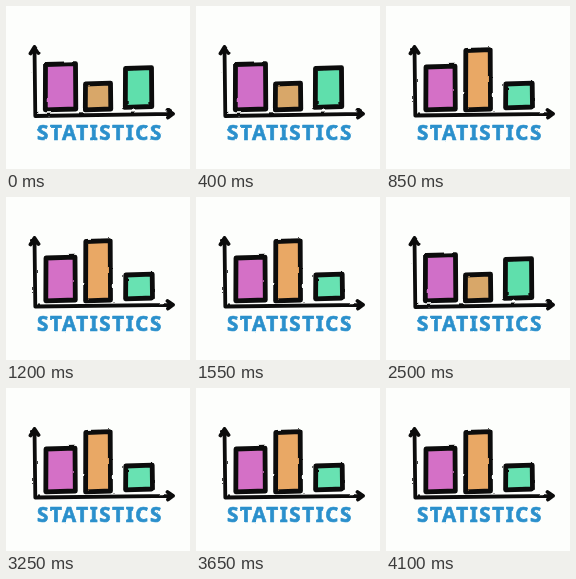
Recreate the animation shown at these times as an HTML page. Size 184 by 163 pixels, loop 4200 ms.

```html
<!DOCTYPE html>
<html lang="en">
<head>
<meta charset="utf-8">
<title>Statistics</title>
<style>
  html, body { margin: 0; width: 100%; height: 100%; overflow: hidden; background: #fdfefc; }
  svg { display: block; width: 100%; height: 100%; }
  path { stroke: #0c0c0c; stroke-linecap: round; stroke-linejoin: round; }
  .axis { fill: none; stroke-width: 3.8; }
  .bar { stroke-width: 4.8; }
  text {
    font: 600 20.5px "Noto Sans", "Open Sans", sans-serif;
    letter-spacing: 1.6px;
    fill: #2b90cc;
    stroke: #2b90cc;
    stroke-width: .7;
    stroke-linejoin: round;
  }
</style>
</head>
<body>
<svg viewBox="0 0 184 163">
  <filter id="rough" x="-5%" y="-5%" width="110%" height="110%" color-interpolation-filters="sRGB">
    <feTurbulence id="grain" type="fractalNoise" baseFrequency=".1" numOctaves="2"/>
    <feDisplacementMap in="SourceGraphic" scale="2" xChannelSelector="R" yChannelSelector="G"/>
    <feGaussianBlur stdDeviation=".55"/>
  </filter>
  <g filter="url(#rough)">
    <path class="axis" id="axes"/>
    <path class="bar"/>
    <path class="bar"/>
    <path class="bar"/>
    <text id="label" x="31" y="134">STATISTICS</text>
  </g>
</svg>
<script>
const LOOP = 4200, HOLD = 812.5;

// Each bar: left, top, right, bottom, fill
const drawings = [
  { origin: 110, bars: [
    [39.5, 58, 69.5, 103.5, '#d06fc8'],
    [79.5, 77.5, 104.5, 103.5, '#d8a769'],
    [119.5, 62, 145.5, 101, '#5fdfac'] ] },
  { origin: 109.5, bars: [
    [40, 60.5, 69, 103.5, '#d470c6'],
    [79.8, 44, 104.2, 103.5, '#e9a865'],
    [119.8, 77.5, 146.2, 101.5, '#68e2b2'] ] },
  { origin: 109.5, bars: [
    [39.5, 78.5, 68.5, 103.5, '#d272c6'],
    [79.5, 59.5, 104.5, 103.5, '#dfa970'],
    [119.5, 42.5, 145.5, 101.5, '#6ad6b4'] ] }
];
const order = [0, 1, 2, 0, 1];

const axes = document.getElementById('axes');
const bars = document.querySelectorAll('.bar');
const grain = document.getElementById('grain');
let shown = -1;

function draw(n) {
  const { origin, bars: boxes } = drawings[n];
  axes.setAttribute('d',
    `M28.5 41L29.3 ${origin}L167 107.8M24.5 47.5L28.5 41L32.5 47M161.5 104L167 107.8L162 111.5`);
  boxes.forEach(([l, t, r, b, fill], i) => {
    bars[i].setAttribute('d', `M${l} ${t + .5}L${r} ${t - .4}L${r + .3} ${b - .5}L${l - .2} ${b + .3}Z`);
    bars[i].setAttribute('fill', fill);
  });
  grain.setAttribute('seed', n + 3);
}

function frame(now) {
  const step = Math.min(order.length - 1, Math.floor(now % LOOP / HOLD));
  if (order[step] !== shown) draw(shown = order[step]);
  requestAnimationFrame(frame);
}
frame(0);
</script>
</body>
</html>
```
